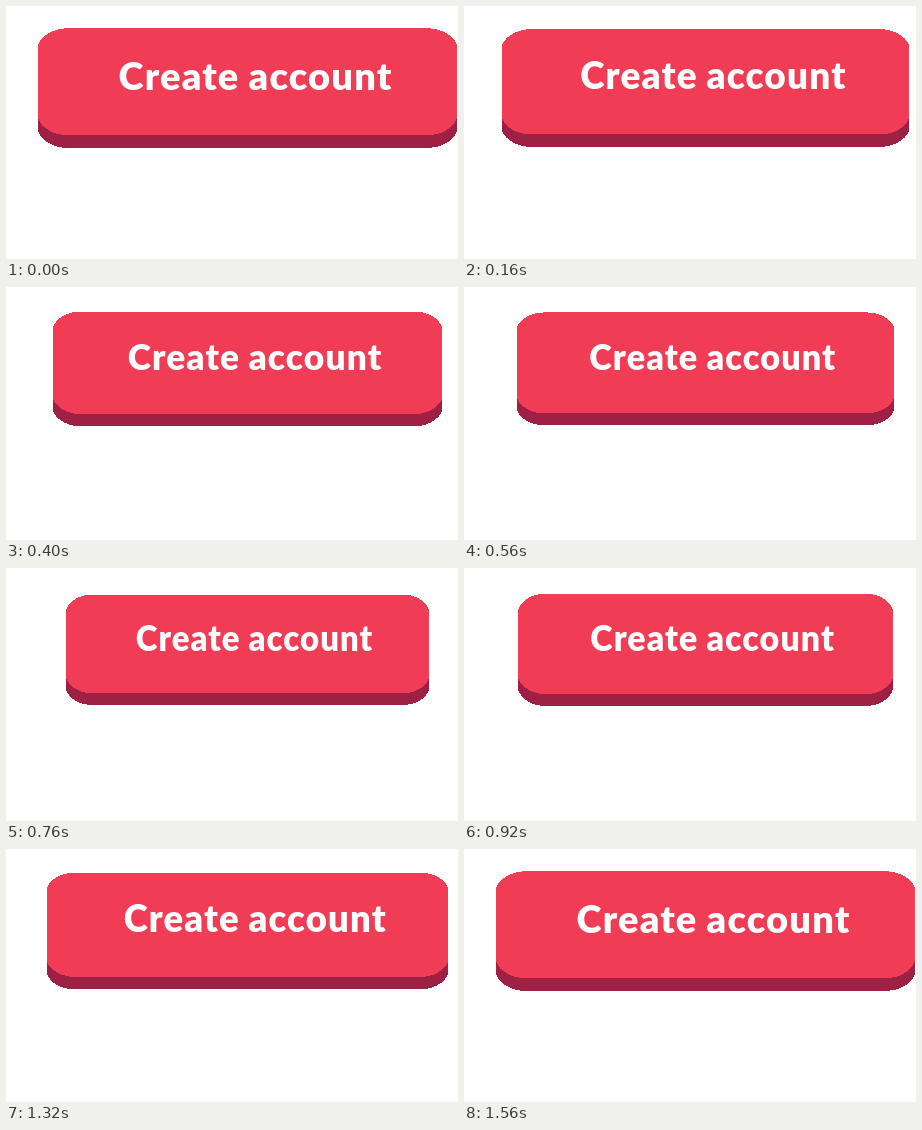
An HTML page for the animation above (1.6 s loop, 452x253 px).

```html
<!DOCTYPE html>
<html>
<head>
<meta charset="utf-8">
<style>
  html, body { margin: 0; height: 100%; overflow: hidden; background: #fff; }
  svg { display: block; width: 452px; height: 253px; }
  use { shape-rendering: crispEdges; }
  text {
    font: 900 38px Lato, sans-serif; letter-spacing: 1.2px; word-spacing: -1px;
    fill: #fff; text-anchor: middle;
  }
</style>
</head>
<body>
<svg viewBox="0 0 452 253">
  <defs>
    <path id="slab" d="M32.2 38.7A31 22 0 0 1 62.2 22.25H420.8A31 22 0 0 1 450.8 38.7
      V112.7A31 22 0 0 1 420.8 129.2H62.2A31 22 0 0 1 32.2 112.7Z"/>
  </defs>
  <g id="button">
    <use href="#slab" y="12.7" fill="#9e2145"/>
    <use href="#slab" fill="#f03c55"/>
    <text x="249.6" y="83.6">Create account</text>
  </g>
</svg>
<script>
  const LOOP = 1600, STEP = 40, TURN = 760, END = 1560;
  const CX = 241.5, CY = 78.2;
  const button = document.getElementById('button');

  // 0 at rest, 1 fully pressed, linear both ways
  const press = t => t < TURN ? t / TURN : (END - t) / (END - TURN);

  function draw() {
    const t = Math.floor(performance.now() % LOOP / STEP) * STEP;
    const p = press(t);
    const sx = 1 - 0.133 * p, sy = 1 - 0.0777 * p;
    button.setAttribute('transform',
      `translate(${CX} ${CY}) scale(${sx} ${sy}) translate(${-CX} ${-CY})`);
    requestAnimationFrame(draw);
  }
  draw();
</script>
</body>
</html>
```
